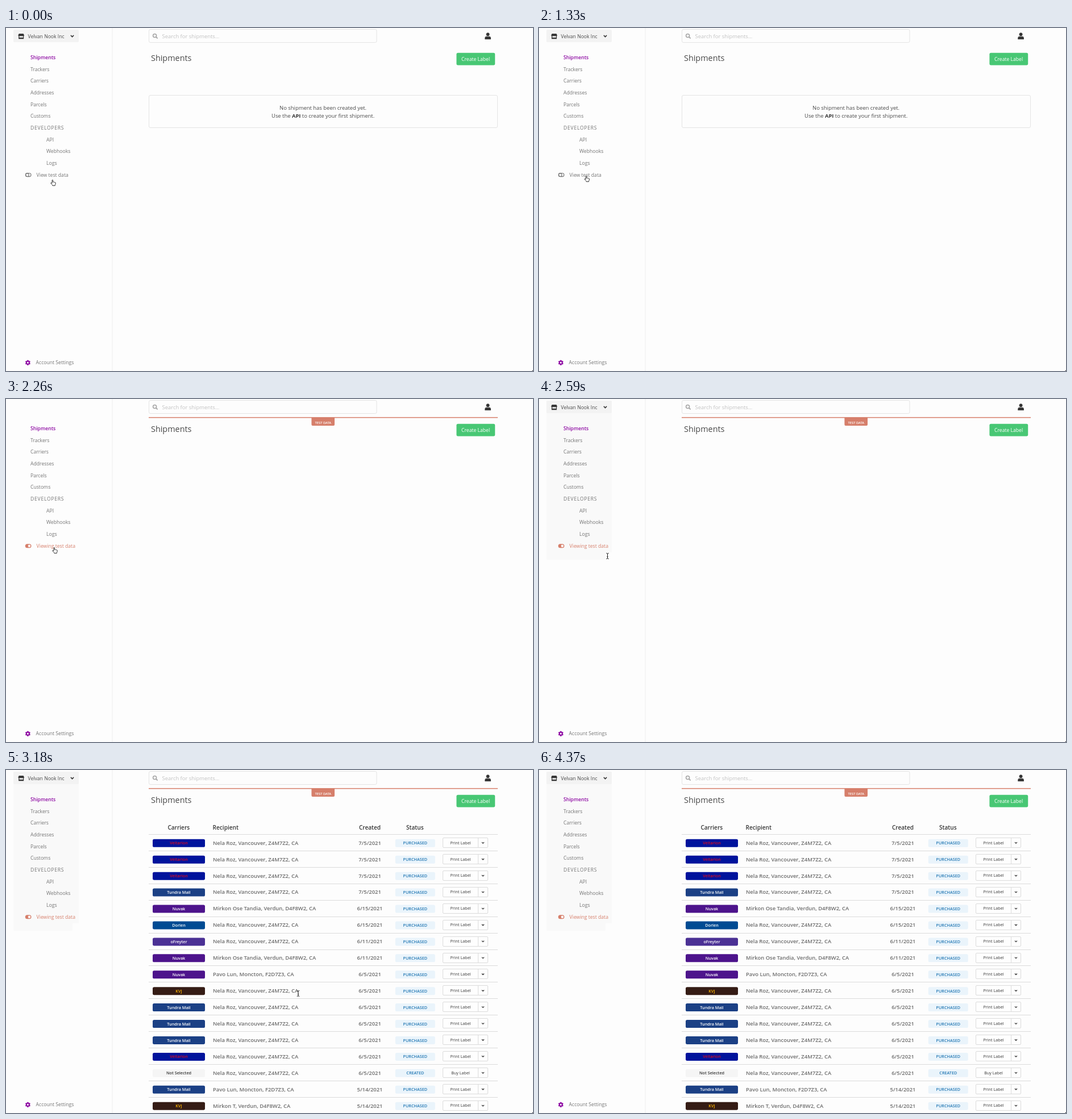
An HTML page that plays this animation: 927 by 604 pixels, repeating every 5970 ms.

```html
<!DOCTYPE html>
<html lang="en">
<head>
<meta charset="utf-8">
<title>Shipments dashboard</title>
<style>
html, body { margin: 0; width: 100%; height: 100%; overflow: hidden; background: #fdfdfd; }
svg { display: block; width: 927px; height: 604px; font-family: "Open Sans", sans-serif; }
.hidden { display: none; }
</style>
</head>
<body>
<svg id="stage" viewBox="0 0 927 604"></svg>
<script>
const LOOP = 5970;
const PURPLE = '#8f0ea4', CORAL = '#d67f6b', GREY = '#757575', DARK = '#363636';
const LINE = '#dbdbdb', PALE_LINE = '#e4e4e4';

const text = (x, y, size, fill, content, extra = '') =>
  `<text x="${x}" y="${y}" font-size="${size}" fill="${fill}" ${extra}>${content}</text>`;
const rect = (x, y, w, h, fill, extra = '') =>
  `<rect x="${x}" y="${y}" width="${w}" height="${h}" fill="${fill}" ${extra}/>`;
const path = (d, extra) => `<path d="${d}" ${extra}/>`;
const group = (id, ...parts) => `<g id="${id}">${parts.join('')}</g>`;
const MIDDLE = 'text-anchor="middle"', SEMI = 'font-weight="600"';
const BOXED = `stroke="${PALE_LINE}" rx="2.5"`;

const chevron = (x, y, r) => path(`M${x - r} ${y - r / 2}l${r} ${r} ${r} ${-r}`,
  `fill="none" stroke="${DARK}" stroke-width="${r * 0.62}"`);

function sidebar() {
  const items = ['Shipments', 'Trackers', 'Carriers', 'Addresses', 'Parcels', 'Customs',
    'DEVELOPERS', 'API', 'Webhooks', 'Logs'];
  return items.map((label, i) => {
    const extra = i === 0 ? SEMI : i === 6 ? 'letter-spacing=".72"' : '';
    return text(i > 6 ? 71 : 43, 55.1 + 20.67 * i, 8.64, i ? GREY : PURPLE, label, extra);
  }).join('');
}

function gear(cx, cy) {
  const teeth = [0, 60, 120].map(a =>
    rect(cx - 1.2, cy - 4.6, 2.4, 9.2, PURPLE, `rx=".5" transform="rotate(${a} ${cx} ${cy})"`)).join('');
  return teeth + `<circle cx="${cx}" cy="${cy}" r="2.5" fill="#fdfdfd" stroke="${PURPLE}" stroke-width="2"/>`;
}

const shopButton = rect(13, 3, 115, 22, '#f3f3f3', 'rx="2"')
  + path('M22.8 10H30.6L32 12.7Q32 14.3 30.4 14.3H23Q21.4 14.3 21.4 12.7Z', `fill="${DARK}"`)
  + path('M22.8 14V18.6H30.6V14', `fill="none" stroke="${DARK}" stroke-width="1.2"`)
  + rect(22.5, 16.8, 8.4, 2, DARK)
  + text(38.5, 17.7, 8.64, '#4a4a4a', 'Velvan Nook Inc')
  + chevron(116.5, 14.2, 2.6);

const toolbar = rect(251.5, 2.5, 400.5, 23, '#fdfdfd', BOXED)
  + '<circle cx="261.6" cy="13.4" r="3" fill="none" stroke="#a3a3a3" stroke-width="1.5"/>'
  + path('M263.8 15.6L266.6 18.4', 'stroke="#a3a3a3" stroke-width="1.8"')
  + text(274.6, 17.7, 9.42, '#c2c2c2', 'Search for shipments...')
  + `<circle cx="847.6" cy="11.2" r="2.9" fill="${DARK}"/>`
  + path('M842.3 20V17.8Q842.3 14.8 845.3 14.8H849.9Q852.9 14.8 852.9 17.8V20Z', `fill="${DARK}"`)
  + text(255, 58, 14.4, '#4a4a4a', 'Shipments')
  + rect(792.4, 43.8, 67.8, 21.6, '#48c774', 'rx="2.6"')
  + text(826.1, 57.9, 8.64, '#fff', 'Create Label', MIDDLE);

const emptyNotice = rect(251.5, 118.5, 613, 57, 'none', BOXED)
  + text(557.6, 143.5, 9.42, '#4a4a4a', 'No shipment has been created yet.', MIDDLE)
  + text(557.6, 157.7, 9.42, '#4a4a4a',
    `Use the <tspan font-weight="700" fill="${DARK}">API</tspan> to create your first shipment.`, MIDDLE);

const toggleOff = rect(34.4, 255.8, 9.6, 5.8, 'none', `rx="2.9" stroke="${GREY}" stroke-width="1.1"`)
  + `<circle cx="37.4" cy="258.7" r="2.8" fill="none" stroke="${GREY}" stroke-width="1.1"/>`
  + text(53.6, 261.8, 8.64, GREY, 'View test data');

const toggleOn = rect(33.8, 255.2, 10.7, 7, CORAL, 'rx="3.5"')
  + '<circle cx="41" cy="258.7" r="2.2" fill="#fdfdfd"/>'
  + text(53.6, 261.8, 8.64, CORAL, 'Viewing test data');

const testBanner = rect(251, 31.9, 614, 1.5, CORAL)
  + path('M537.4 33H578V45Q578 47 576 47H539.4Q537.4 47 537.4 45Z', `fill="${CORAL}"`)
  + text(557.8, 43.8, 5.76, '#fff', 'TEST DATA', `${MIDDLE} ${SEMI}`);

const CARRIERS = {
  V: ['Veltarion', '#00139c', '#dc0a1e'],
  T: ['Tundra Mail', '#1b4085', '#fff'],
  N: ['Nuvak', '#4d148c', '#fff'],
  D: ['Dorlen', '#004b93', '#fff'],
  F: ['oFreyter', '#4b3195', '#fff'],
  K: ['KVJ', '#351c15', '#ffb500'],
  '-': ['Not Selected', '#f5f5f5', DARK]
};
const PEOPLE = {
  n: 'Nela Roz, Vancouver, Z4M7Z2, CA',
  m: 'Mirkon Ose Tandia, Verdun, D4F8W2, CA',
  p: 'Pavo Lun, Moncton, F2D7Z3, CA',
  t: 'Mirkon T, Verdun, D4F8W2, CA'
};
// Each row: carrier key, recipient key, date.
const ROWS = ['Vn7/5', 'Vn7/5', 'Vn7/5', 'Tn7/5', 'Nm6/15', 'Dn6/15', 'Fn6/11', 'Nm6/11', 'Np6/5',
  'Kn6/5', 'Tn6/5', 'Tn6/5', 'Tn6/5', 'Vn6/5', '-n6/5', 'Tp5/14', 'Kt5/14'];

const tag = (cx, cy, width, fill, ink, label) =>
  rect(cx - width / 2, cy - 6.7, width, 14, fill, 'rx="2.6"')
  + text(cx, cy + 2.9, 7.23, ink, label, `${MIDDLE} ${SEMI}`);

function tableRow(row, i) {
  const [carrier, fill, ink] = CARRIERS[row[0]];
  const open = row[0] === '-';
  const cy = 128.5 + 28.93 * i;
  const boxTop = Math.floor(cy - 9) + 0.5;
  return rect(251, Math.floor(113.5 + 28.93 * i), 614, 1, LINE)
    + tag(304, cy, 92, fill, ink, carrier)
    + text(364, cy + 3.2, 9.42, '#6b6b6b', PEOPLE[row[1]], SEMI)
    + text(640, cy + 3.2, 9.42, '#6b6b6b', row.slice(2) + '/2021', `${MIDDLE} ${SEMI}`)
    + tag(719.8, cy, 70, '#eaf4fb', '#2277b3', open ? 'CREATED' : 'PURCHASED')
    + rect(768.5, boxTop, 79, 17, '#fefefe', `stroke="${LINE}" rx="1.5"`)
    + rect(830, boxTop, 1, 17, LINE)
    + text(799.5, cy + 2.1, 7.23, DARK, open ? 'Buy Label' : 'Print Label', MIDDLE)
    + chevron(839, cy - 0.4, 2);
}

const tableHead = [['Carriers', 303.8], ['Created', 640], ['Status', 719.3]]
  .map(([label, x]) => text(x, 105.2, 10.08, DARK, label, `${MIDDLE} ${SEMI}`)).join('')
  + text(363.6, 105.2, 10.08, DARK, 'Recipient', SEMI);

const hand = path('M3 6.4V1.3Q3 .5 3.8 .5T4.6 1.3V4.2Q6 3.7 6.3 4.5Q7.6 4.1 7.9 4.9Q9.2 4.7 9.2 6'
  + 'Q9.2 8.4 8.3 9.3V10.6H3.9V9.7Q2.4 8.5 .8 6.4Q.6 5.4 1.7 5.5Z',
  'fill="#fff" stroke="#222" stroke-width=".9" stroke-linejoin="round"');
const ibeam = path('M-2.2 -5Q0 -5 0 -3.6Q0 -5 2.2 -5M0 -3.8V3.8M-2.2 5Q0 5 0 3.6Q0 5 2.2 5M-1.1 1.2H1.1',
  'fill="none" stroke="#222" stroke-width="1"');
const arrow = path('M.6 .8V9.2L2.7 7.3L4 10.4L5.5 9.8L4.2 6.8H7Z',
  'fill="#111" stroke="#fff" stroke-width=".7"');

document.getElementById('stage').innerHTML =
  rect(186.5, 0, 1, 604, '#ededed')
  + group('menuShade', path('M13 3H128V270H117V283H13Z', 'fill="#f9f9f9"'))
  + group('shop', shopButton)
  + sidebar() + toolbar + gear(38.4, 589.3)
  + text(52.6, 592.3, 8.64, GREY, 'Account Settings')
  + group('live', emptyNotice, toggleOff)
  + group('test', toggleOn, testBanner)
  + group('table', tableHead, ...ROWS.map(tableRow))
  + path('M927 602V604H925Q926.6 603.6 927 602Z', 'fill="#222"')
  + group('hand', hand) + group('ibeam', ibeam) + group('arrow', arrow);

// Pointer samples: start time, shape, x, y.
const POINTER = [
  [0, 'hand', 78, 267], [150, 'hand', 78.3, 264], [300, 'hand', 79, 261], [440, 'hand', 79.3, 260],
  [1190, 'hand', 79, 260], [1330, 'hand', 79.3, 260], [2110, 'hand', 81, 261], [2440, 'hand', 81, 262],
  [2590, 'ibeam', 120.5, 276.5], [2740, 'ibeam', 439.5, 374], [2880, 'ibeam', 516.5, 397.5],
  [3030, 'ibeam', 514, 393.5], [3480, 'ibeam', 513.7, 393.5],
  [3630, 'arrow', 688, 481], [3780, 'arrow', 856, 581], [3930, 'arrow', 855.5, 581],
  [4080, 'arrow', 857, 581], [4230, 'arrow', 868, 602], [4370, 'none', 0, 0]
];

const show = (id, visible) => document.getElementById(id).classList.toggle('hidden', !visible);

function draw(t) {
  show('live', t < 2260);
  show('test', t >= 2260);
  show('shop', t < 2260 || t >= 2590);
  show('menuShade', t >= 2590);
  show('table', t >= 3180);
  const [, shape, x, y] = POINTER.findLast(sample => sample[0] <= t);
  for (const id of ['hand', 'ibeam', 'arrow']) {
    show(id, id === shape);
    document.getElementById(id).setAttribute('transform', `translate(${x} ${y})`);
  }
}

const start = performance.now();
function tick() {
  draw((performance.now() - start) % LOOP);
  requestAnimationFrame(tick);
}
tick();
</script>
</body>
</html>
```
